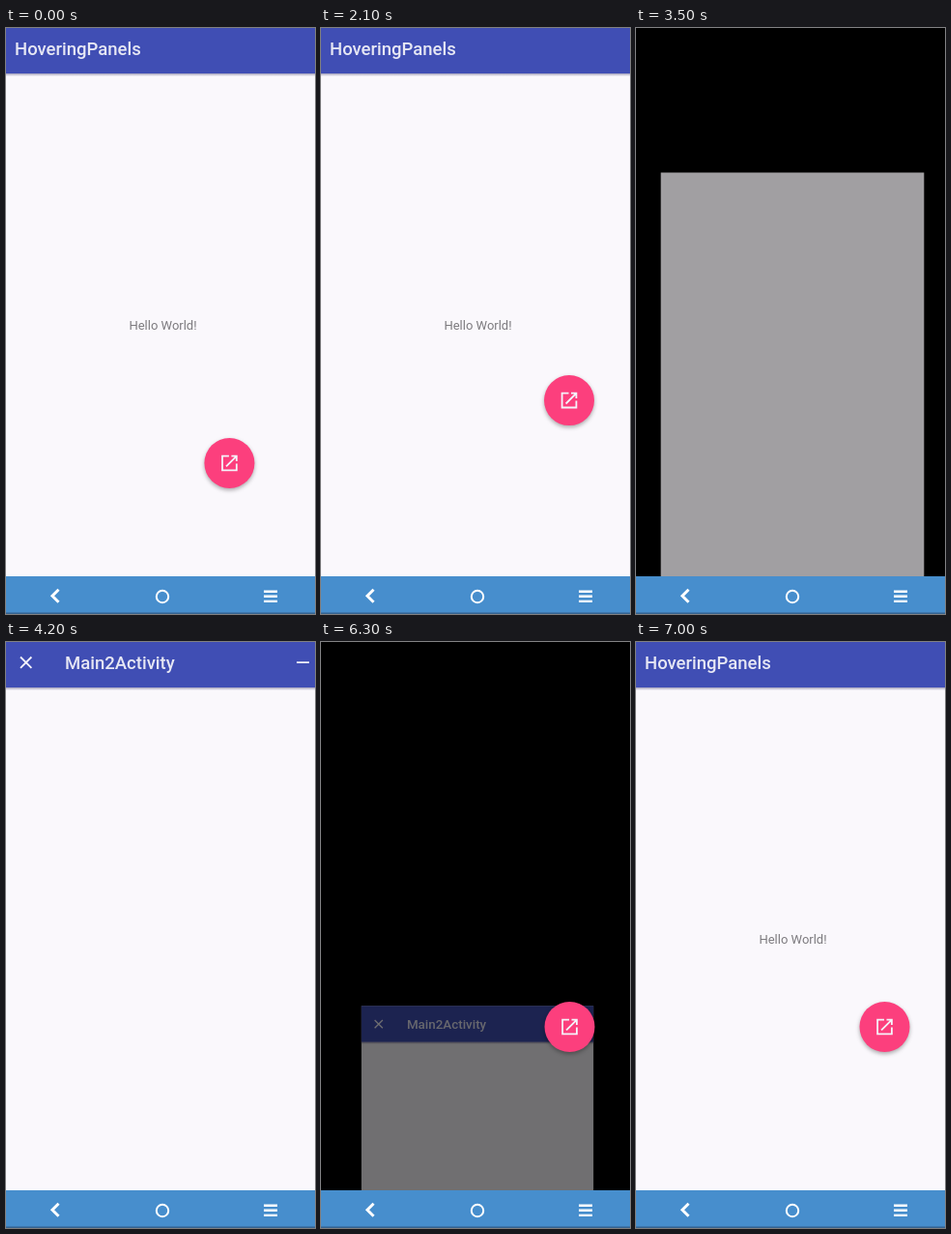
These frames come from a looping animation (320 by 606 pixels, 7.1 s). An HTML page:

```html
<!DOCTYPE html>
<html lang="en">
<head>
<meta charset="utf-8">
<style>
  html, body { margin: 0; width: 100%; height: 100%; overflow: hidden; background: #000; }
  svg { display: block; width: 320px; height: 606px; }
  text { font-family: Roboto, sans-serif; }
  .title { font-size: 18.5px; font-weight: 500; fill: #e6e7f4; }
  .line { fill: none; stroke: #f4f3fa; stroke-width: 1.8; }
  #fab { filter: drop-shadow(0 2px 2px rgba(0, 0, 0, .32)); }
</style>
</head>
<body>
<svg viewBox="0 0 320 606">
  <defs>
    <linearGradient id="shade" x2="0" y2="1">
      <stop stop-color="#8583a5" stop-opacity=".75"/>
      <stop offset="1" stop-color="#8583a5" stop-opacity="0"/>
    </linearGradient>
    <g id="bar">
      <path fill="#404eb4" d="M-4-5h332v52H-4z"/>
      <path fill="url(#shade)" d="M-4 47h332v3H-4z"/>
    </g>
    <path id="page" fill="#faf8fc" d="M-4-5h332v572H-4z"/>
  </defs>
  <rect width="320" height="606"/>

  <g id="main">
    <use href="#page"/>
    <use href="#bar"/>
    <text class="title" x="9" y="28">HoveringPanels</text>
    <text x="162.5" y="312" text-anchor="middle" font-size="13" fill="#7d7b7f">Hello World!</text>
  </g>

  <g id="second">
    <use href="#page"/>
    <g id="content">
      <use href="#bar"/>
      <path class="line" d="M15 15.5l11.4 11.4M26.4 15.5L15 26.9M301 21.2h13"/>
      <text class="title" x="61" y="28">Main2Activity</text>
    </g>
  </g>

  <g id="fab">
    <circle r="26" fill="#fc3f7d"/>
    <path class="line" d="M-.5-7.4H-7.4V7.4H7.4V.5M2-7.4H7.4V-2M7.2-7.2L-3.4 3.4"/>
  </g>

  <path fill="#478ecd" d="M0 567h320v39H0z"/>
  <path fill="#35638f" d="M0 604.6h320v1.4H0z"/>
  <g fill="none" stroke="#fff">
    <path stroke-width="3" d="M54.5 580.7L48 587.2l6.5 6.5"/>
    <circle cx="162" cy="588" r="6.2" stroke-width="2"/>
    <path stroke-width="2.4" d="M267 582.7h14M267 587.8h14M267 592.9h14"/>
  </g>
</svg>
<script>
const LOOP = 7100;
const [main, second, content, fab] =
  ['main', 'second', 'content', 'fab'].map(id => document.getElementById(id));

// Drag path of the button: time, x, y
const drag = [
  [0, 231.5, 450], [450, 155, 418], [850, 150, 352], [1300, 251, 303.5],
  [1700, 250, 335], [2100, 257, 385], [2400, 257.5, 398]
];

const progress = (t, start, length) => Math.min(1, Math.max(0, (t - start) / length));
const leave = (t, start) => progress(t, start, 405) ** 2;
const arrive = (t, start) => (1 - progress(t, start, 500)) ** 2;

function spline(a, b, c, d, u) {
  return b + u / 2 * (c - a + u * (2 * a - 5 * b + 4 * c - d + u * (3 * (b - c) + d - a)));
}

function dragPoint(t) {
  const last = drag.length - 1;
  if (t >= drag[last][0]) return drag[last].slice(1);
  const i = drag.findIndex(p => p[0] > t) - 1;
  const near = [-1, 0, 1, 2].map(k => drag[Math.min(last, Math.max(0, i + k))]);
  const u = progress(t, near[1][0], near[2][0] - near[1][0]);
  return [1, 2].map(axis => spline(...near.map(p => p[axis]), u));
}

// away: 0 is fully open, 1 is half size and transparent
function place(el, away, travel) {
  el.setAttribute('transform',
    `translate(162 ${281 + away * travel}) scale(${1 - away / 2}) translate(-162 -281)`);
  el.setAttribute('opacity', 1 - away);
}

const show = (el, on) => el.setAttribute('visibility', on ? 'visible' : 'hidden');

function draw(t) {
  place(main, t < 5000 ? leave(t, 3004) : arrive(t, 6310), -321);
  if (t < 5000) place(second, arrive(t, 3300), 289);
  else place(second, leave(t, 6000), 547);
  show(content, t >= 3600);
  show(fab, t < 3000 || t >= 6050);
  fab.setAttribute('transform', `translate(${dragPoint(t)})`);
}

const begin = performance.now();
function tick() {
  draw((performance.now() - begin) % LOOP);
  requestAnimationFrame(tick);
}
tick();
</script>
</body>
</html>
```
